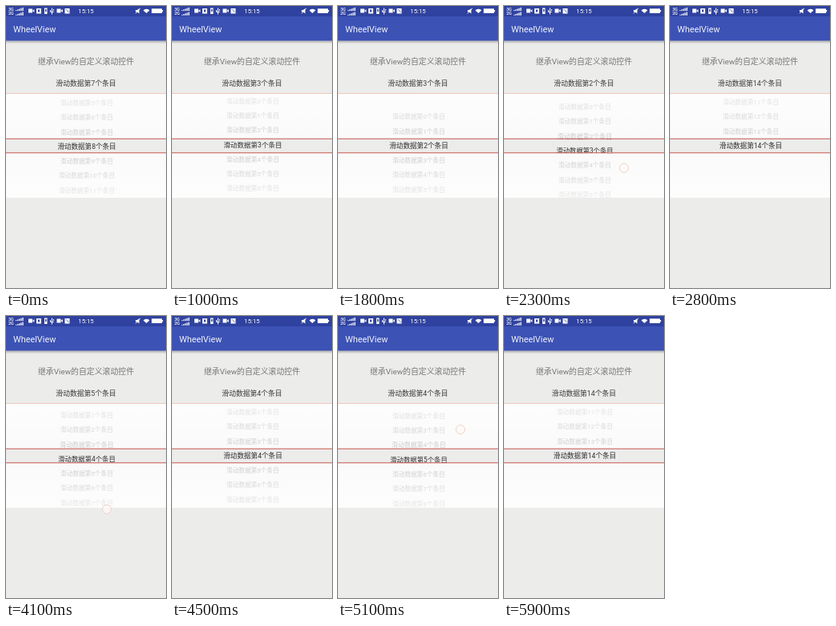
Write an HTML page with a canvas that moves like this. It is 200 px wide and 353 px high and loops after 6 s.

```html
<!DOCTYPE html>
<html lang="zh-CN">
<head>
<meta charset="utf-8">
<title>WheelView</title>
<style>
html, body { margin: 0; width: 100%; height: 100%; overflow: hidden; background: #ececeb; }
canvas { display: block; width: 200px; height: 353px; }
</style>
</head>
<body>
<canvas id="stage"></canvas>
<script>
const W = 200, H = 353, LOOP = 6000;
const canvas = document.getElementById('stage');
const ctx = canvas.getContext('2d');
const ratio = window.devicePixelRatio || 1;
canvas.width = Math.round(W * ratio);
canvas.height = Math.round(H * ratio);

const FONT = 'Roboto, "Noto Sans CJK SC", "Noto Sans CJK", sans-serif';
const LIST = { top: 110, bottom: 240, mid: 175, pitch: 18.3, last: 14 };
const BAND = { top: 166, bottom: 184 };

const ease = {
  hold: () => 1,
  smooth: u => u * u * (3 - 2 * u),
  out: u => 1 - (1 - u) ** 2,
  fling: u => 1 - (1 - u) ** 3,
  in: u => u ** 3
};

// time, selected position, easing towards that key
const keys = [
  [-250, 7, 'hold'], [20, 7.96, 'smooth'], [120, 8, 'out'], [300, 8, 'hold'],
  [830, 3.4, 'smooth'], [1130, 3, 'out'], [1550, 3, 'hold'], [1800, 2, 'smooth'],
  [2150, 2, 'hold'], [2400, 5, 'in'], [2690, 14, 'fling'], [2930, 14, 'hold'],
  [3330, 8.8, 'smooth'], [3550, 8, 'out'], [3680, 8, 'hold'], [4060, 3.78, 'smooth'],
  [4150, 3.78, 'hold'], [4320, 4, 'smooth'], [4850, 4, 'hold'],
  [5200, 6, 'in'], [5650, 14, 'fling'], [6000, 14, 'hold']
];

// start, end, x, y at release
const touches = [
  [300, 850, 130, 246], [1500, 1680, 140, 160], [2120, 2400, 150, 160],
  [2900, 3330, 128, 236], [3660, 4150, 126, 242], [4800, 5200, 153, 119]
];

function position(t) {
  const i = Math.max(1, keys.findIndex(k => k[0] >= t));
  const [t0, p0] = keys[i - 1], [t1, p1, kind] = keys[i];
  const u = Math.min(1, Math.max(0, (t - t0) / (t1 - t0)));
  return p0 + (p1 - p0) * ease[kind](u);
}

function rect(color, x, y, w, h) {
  ctx.fillStyle = color;
  ctx.fillRect(x, y, w, h);
}

function text(str, x, y, size, color, align = 'center', weight = 400) {
  ctx.font = `${weight} ${size}px ${FONT}`;
  ctx.textAlign = align;
  ctx.fillStyle = color;
  ctx.fillText(str, x, y + size * 0.37);
}

function shape(points, color = '#fff') {
  ctx.fillStyle = color;
  ctx.beginPath();
  points.forEach(([x, y]) => ctx.lineTo(x, y));
  ctx.fill();
}

const itemLabel = n => `滑动数据第${n}个条目`;

function vertical(y0, y1, from, to) {
  const g = ctx.createLinearGradient(0, y0, 0, y1);
  g.addColorStop(0, from);
  g.addColorStop(1, to);
  return g;
}

function drawCamera(x) {
  rect('#fff', x, 3.5, 5, 5);
  shape([[x + 5, 6], [x + 7.3, 4], [x + 7.3, 8]]);
}

function drawStatusBar() {
  rect('#2f429f', 0, 0, W, 13);
  ['3G', '2G'].forEach((name, row) => {
    const y = 3.6 + row * 5.7;
    text(name, 3, y, 5.4, '#fff', 'left', 500);
    for (let i = 0; i < 5; i++) rect('#fff', 12 + i * 2.1, y + 1.5 - i * 0.8, 1.3, 1 + i * 0.8);
  });

  drawCamera(28);
  rect('#fff', 38, 3, 6, 6.5);
  rect('#2f429f', 40, 4.5, 2, 3);
  rect('#fff', 48, 2.5, 3.5, 7.5);
  rect('#2f429f', 49, 4, 1.5, 3);
  rect('#fff', 57, 2.5, 1, 8);
  rect('#fff', 55, 5, 1, 2);
  rect('#fff', 59, 4, 1, 2);
  rect('#fff', 55, 7, 5, 0.8);
  drawCamera(63.5);
  rect('#fff', 73.5, 3, 6, 6.5);
  ctx.strokeStyle = '#2f429f';
  ctx.lineWidth = 0.8;
  ctx.beginPath();
  ctx.moveTo(75, 4.2);
  ctx.lineTo(78.5, 8);
  ctx.stroke();

  text('15:15', 100, 6.3, 7.8, '#fff');

  shape([[162, 5], [164, 5], [166.5, 3], [166.5, 9.5], [164, 7.5], [162, 7.5]]);
  ctx.strokeStyle = '#fff';
  ctx.beginPath();
  ctx.moveTo(162, 9.5);
  ctx.lineTo(168, 2.8);
  ctx.stroke();

  ctx.fillStyle = '#fff';
  ctx.beginPath();
  ctx.moveTo(175.5, 9);
  ctx.arc(175.5, 9, 5.2, -Math.PI * 0.77, -Math.PI * 0.23);
  ctx.fill();
  rect('#fff', 182, 3.3, 13, 5.7);
  rect('#fff', 195, 5, 1.2, 2.3);
}

function drawAppBar() {
  rect('#3c52b5', 0, 12.5, W, 31);
  rect(vertical(43.5, 47.5, 'rgba(0,0,0,.25)', 'rgba(0,0,0,0)'), 0, 43.5, W, 4);
  text('WheelView', 9, 28.8, 10.9, '#f1f3fb', 'left');
}

function drawWheel(p) {
  const { top, bottom, mid, pitch, last } = LIST;
  ctx.save();
  ctx.beginPath();
  ctx.rect(0, top, W, bottom - top);
  ctx.clip();
  for (let n = 0; n <= last; n++) {
    const offset = (n - p) * pitch;
    if (Math.abs(offset) > 80) continue;
    const near = Math.max(0, 1 - Math.abs(offset) / pitch);
    text(itemLabel(n), 101, mid + offset, 7.7 + 0.9 * near, '#303030');
  }
  const inner = 'rgba(255,255,255,.75)', outer = 'rgba(255,255,255,.89)';
  rect(vertical(top, BAND.top, outer, inner), 0, top, W, BAND.top - top);
  rect(vertical(BAND.bottom, bottom, inner, outer), 0, BAND.bottom, W, bottom - BAND.bottom);
  ctx.restore();
  rect('#efc9bd', 0, 109, W, 1);
  rect('#c6564c', 0, 165.7, W, 1);
  rect('#c6564c', 0, 183.3, W, 1);
}

function drawTouch(t, p) {
  const touch = touches.find(([start, end]) => t >= start && t <= end);
  if (!touch) return;
  const [, end, x, endY] = touch;
  ctx.beginPath();
  ctx.arc(x, endY - (p - position(end)) * LIST.pitch, 5.5, 0, Math.PI * 2);
  ctx.fillStyle = 'rgba(255,250,247,.7)';
  ctx.fill();
  ctx.strokeStyle = '#edd3c9';
  ctx.lineWidth = 1;
  ctx.stroke();
}

function draw(t) {
  const p = position(t);
  ctx.setTransform(canvas.width / W, 0, 0, canvas.height / H, 0, 0);
  rect('#ececeb', 0, 0, W, H);
  drawAppBar();
  drawStatusBar();
  text('继承View的自定义滚动控件', 100, 69, 9.9, '#777');
  // The heading follows the wheel with a short delay.
  text(itemLabel(Math.round(position(t - 150))), 100, 96.3, 8.8, '#3c3c3c');
  drawWheel(p);
  drawTouch(t, p);
}

const begin = performance.now();
function tick() {
  draw((performance.now() - begin) % LOOP);
  requestAnimationFrame(tick);
}
tick();
</script>
</body>
</html>
```
